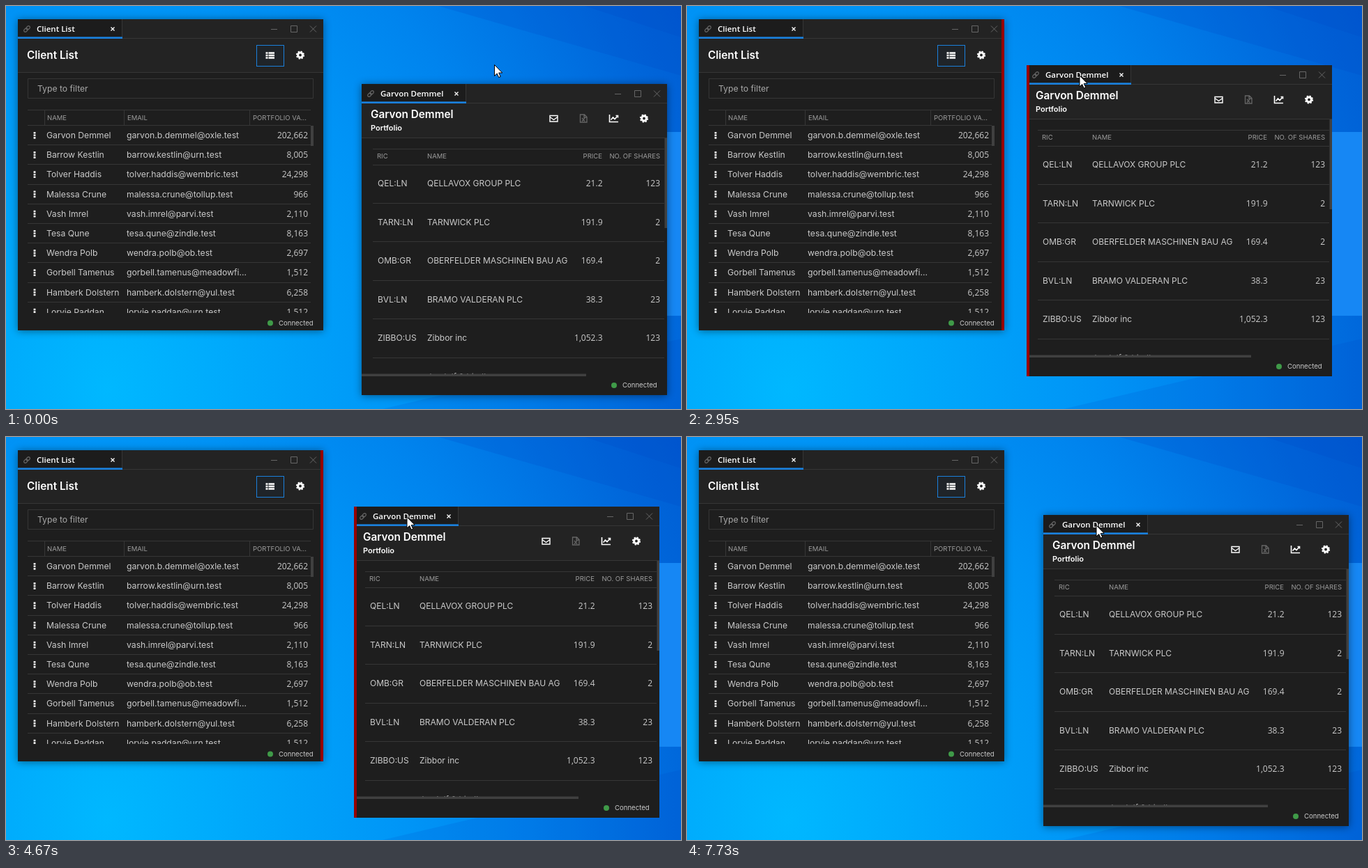
These frames come from a looping animation (968 by 579 pixels, 8 s). An HTML page:

```html
<!DOCTYPE html>
<html lang="en">
<head>
<meta charset="utf-8">
<title>Window docking</title>
<style>
  html, body { margin: 0; width: 100%; height: 100%; overflow: hidden; }
  body { background: radial-gradient(1000px 1250px at 145px 550px, #00b8ff, #0094f6 44%, #0084ee 60%, #0066da 84%, #0058d0); }
  svg { display: block; width: 968px; height: 579px; }
  text { font: 12.2px Inter, sans-serif; fill: #cacaca; white-space: pre; }
  .num { font: 12px "Open Sans", sans-serif; }
  .stock { font-size: 12px; }
  .col { font-size: 9.5px; fill: #9c9c9c; }
  .tab { font: 600 11.5px "Open Sans", sans-serif; fill: #fff; }
  .title { font-size: 15.3px; font-weight: 600; fill: #fff; }
  .sub { font-size: 11px; font-weight: 600; fill: #fff; }
  .hint { fill: #a8a8a8; }
  .foot { font-size: 9.6px; }
  .shadow { filter: drop-shadow(0 1px 6px rgba(0, 0, 0, .45)); }
  .rule { stroke: #363636; fill: none; }
  .icon { stroke: #fff; fill: none; }
  .dim { stroke: #666; fill: none; }
  .snap { fill: #960303; }
</style>
</head>
<body>
<svg viewBox="0 0 968 579">
  <defs>
    <clipPath id="clientRows"><rect y="153" width="438" height="269"/></clipPath>
    <clipPath id="stockRows"><rect y="117" width="434" height="300.5"/></clipPath>
  </defs>
  <g fill="#0046c0">
    <path d="M620 0H968V100Z" opacity=".2"/>
    <path d="M830 0H968V45Z" opacity=".2"/>
    <path d="M968 478V579H540Z" opacity=".15"/>
  </g>
  <rect x="900" y="181" width="264" height="264" fill="#1687f4"/>
  <g id="client" transform="translate(17 19)"></g>
  <g id="portfolio"></g>
  <path id="cursor" d="M.5 .5V16.5L4.2 13L6.7 18.6L9.2 17.5L6.7 12H11.7Z" fill="#fff" stroke="#000"/>
</svg>
<script>
const LOOP = 8000, STEP = 70, W = 438, H = 447;
const GRAB = { x: 75.5, y: 14.5 };
const DRAG_START = 1100, DROP = 7260, SNAP_X = 502;

const clients = [
  ["Garvon Demmel", "garvon.b.demmel@oxle.test", "202,662"],
  ["Barrow Kestlin", "barrow.kestlin@urn.test", "8,005"],
  ["Tolver Haddis", "tolver.haddis@wembric.test", "24,298"],
  ["Malessa Crune", "malessa.crune@tollup.test", "966"],
  ["Vash Imrel", "vash.imrel@parvi.test", "2,110"],
  ["Tesa Qune", "tesa.qune@zindle.test", "8,163"],
  ["Wendra Polb", "wendra.polb@ob.test", "2,697"],
  ["Gorbell Tamenus", "gorbell.tamenus@meadowfi...", "1,512"],
  ["Hamberk Dolstern", "hamberk.dolstern@yul.test", "6,258"],
  ["Lorvie Paddan", "lorvie.paddan@urn.test", "1,512"]
];
const stocks = [
  ["QEL:LN", "QELLAVOX GROUP PLC", "21.2", "123"],
  ["TARN:LN", "TARNWICK PLC", "191.9", "2"],
  ["OMB:GR", "OBERFELDER MASCHINEN BAU AG", "169.4", "2"],
  ["BVL:LN", "BRAMO VALDERAN PLC", "38.3", "23"],
  ["ZIBBO:US", "Zibbor inc", "1,052.3", "123"],
  ["", " landolf & bindle", "", ""]
];

// y is the vertical middle of the line of text
const text = (x, y, str, cls = "", anchor = "start") =>
  `<text x="${x}" y="${y}" dy=".36em" class="${cls}" text-anchor="${anchor}">${str.replace("&", "&amp;")}</text>`;
const path = (d, cls = "rule", extra = "") => `<path d="${d}" class="${cls}" ${extra}/>`;
const box = (x, y, w, h, fill) => `<rect x="${x}" y="${y}" width="${w}" height="${h}" fill="${fill}"/>`;
const gear = (x, y) => `<g class="icon" transform="translate(${x} ${y})">
  <circle r="3.4" stroke-width="3"/><circle r="5.2" stroke-width="1.8" stroke-dasharray="2.2 1.884"/></g>`;

function frame(name, headerBottom, footY) {
  return `<rect class="shadow" width="${W}" height="${H}"/>`
    + box(0, 0, W, H, "#1e1e1e") + box(0, 0, W, headerBottom, "#232323")
    + box(0, 0, 150, 28, "#1c1c1c") + box(0, 25.3, 150, 2.7, "#1b80dc")
    + path(`M149.5 0V25M150 27.5H${W}M0 ${headerBottom + .5}H${W}`)
    + `<g class="dim" stroke-width="1.2" transform="translate(13 14) rotate(-45)">
        <rect x="-5.3" y="-2" width="6" height="4" rx="2"/><rect x="-.7" y="-2" width="6" height="4" rx="2"/></g>`
    + text(27, 14, name, "tab")
    + path("M133.5 11.5l5 5m0-5l-5 5", "icon", 'stroke-width="1.3"')
    + path("M363 14.5h9M391.5 9.5h9v9h-9zM419 9.5l9 9m0-9l-9 9", "dim")
    + `<circle cx="362" cy="${footY}" r="4" fill="#3f9a48"/>` + text(374, footY, "Connected", "foot");
}

function clientWindow() {
  const rows = clients.map(([name, email, value], i) => {
    const y = 166.7 + 28.2 * i, line = Math.round(y + 13.5) + .5;
    return path(`M24 ${y - 4.8}v10`, "icon", 'stroke-width="2.8" stroke-dasharray="2.6 1"')
      + text(41, y, name) + text(156, y, email) + text(416, y, value, "num", "end")
      + path(`M14 ${line}H420`);
  }).join("");
  return frame("Client List", 76, 436.5)
    + text(13, 51, "Client List", "title")
    + '<rect x="342.5" y="37.5" width="39" height="30" fill="#1f2429" stroke="#1b80dc"/>'
    + path("M355.5 48.5h3m1 0h8.5M355.5 52h3m1 0h8.5M355.5 55.5h3m1 0h8.5", "icon", 'stroke-width="2.6"')
    + gear(405, 51.5)
    + path("M14.5 85.5h409v28h-409z") + text(28, 100, "Type to filter", "hint")
    + path("M14 130.5H420M14 152.5H420M38.5 131v21M152.5 131v21M332.5 131v21")
    + text(42, 141.5, "NAME", "col") + text(157, 141.5, "EMAIL", "col") + text(337, 141.5, "PORTFOLIO VA...", "col")
    + `<g clip-path="url(#clientRows)">${rows}</g>`
    + box(420, 153, 4, 29, "#404040");
}

function portfolioWindow() {
  const rows = stocks.map(([ric, name, price, shares], i) => {
    const y = 143 + 55.5 * i, line = Math.floor(y + 28) + .5;
    return text(23, y, ric, "stock") + text(94, y, name, "stock")
      + text(345.5, y, price, "num", "end") + text(428, y, shares, "num", "end")
      + path(`M16 ${line}H434`);
  }).join("");
  return frame(clients[0][0], 77, 433)
    + text(13, 43.5, clients[0][0], "title") + text(13, 63, "Portfolio", "sub")
    + path("M270 45.5h11v8.5h-11zM270 47.5l5.5 4 5.5-4", "icon", 'stroke-width="1.4"')
    + path("M313.5 44h6l3.5 3.5v7.5h-9.5zM319 44v4h4M316 49l4 4.5m0-4.5l-4 4.5", "dim", 'stroke-width="1.3"')
    + path("M355.5 44v10.5h12.5M357.5 51.5l3-3.5 2.5 2.5 4.5-5m-3 0h3v3", "icon", 'stroke-width="1.6"')
    + gear(405, 49.5)
    + path("M16 93.5H434M16 116.5H434")
    + text(22, 104, "RIC", "col") + text(94, 104, "NAME", "col")
    + text(345, 104, "PRICE", "col", "end") + text(428, 104, "NO. OF SHARES", "col", "end")
    + `<g clip-path="url(#stockRows)">${rows}</g>`
    + box(0, 416.5, 322, 3.5, "#404040") + box(434.5, 78, 3.5, 129, "#404040");
}

const [client, portfolio, cursor] = ["client", "portfolio", "cursor"].map(id => document.getElementById(id));
client.innerHTML = clientWindow() + `<rect class="snap" x="434" width="4" height="${H}"/>`;
portfolio.innerHTML = portfolioWindow() + `<rect class="snap" width="4" height="${H}"/>`;
const snapEdges = document.querySelectorAll(".snap");
const portfolioShadow = portfolio.querySelector(".shadow");

// Keys are [time, x, y]
const windowPath = [
  [DRAG_START, 510, 112], [1660, 517, 100], [1800, 505, 94], [2280, 488, 86], [2880, 488, 86],
  [2950, 487, 85], [3720, 508, 108], [3790, 511, 110], [4260, 511, 110], [4670, 499, 100],
  [5090, 491, 93], [5890, 491, 93], [5960, 491, 94], [6720, 509, 109], [6860, 511, 112]
];
const approachPath = [[0, 700, 84], [70, 699, 84], [820, 588, 118], [DRAG_START, 585.5, 126.5]];

// Position on a path, advancing in steps as a screen recording does
function along(keys, t) {
  const next = keys.findIndex(key => key[0] > t);
  if (next < 1) {
    const [, x, y] = next ? keys[keys.length - 1] : keys[0];
    return { x, y };
  }
  const [t0, x0, y0] = keys[next - 1], [t1, x1, y1] = keys[next];
  const k = Math.floor((t - t0) / STEP) * STEP / (t1 - t0);
  return { x: x0 + (x1 - x0) * k, y: y0 + (y1 - y0) * k };
}

const moveTo = (el, x, y) => el.setAttribute("transform", `translate(${x} ${y})`);

function draw(now) {
  const t = now % LOOP;
  const pos = along(windowPath, t), x = Math.round(pos.x), y = Math.round(pos.y);
  const pointer = t < DRAG_START ? along(approachPath, t) : { x: x + GRAB.x, y: y + GRAB.y };
  const dragging = t >= DRAG_START && t < DROP;
  moveTo(portfolio, x, y);
  moveTo(cursor, pointer.x, pointer.y);
  portfolioShadow.style.filter = dragging ? "none" : "";
  snapEdges.forEach(edge => edge.style.display = dragging && x < SNAP_X ? "" : "none");
  requestAnimationFrame(() => draw(performance.now()));
}
draw(0);
</script>
</body>
</html>
```
